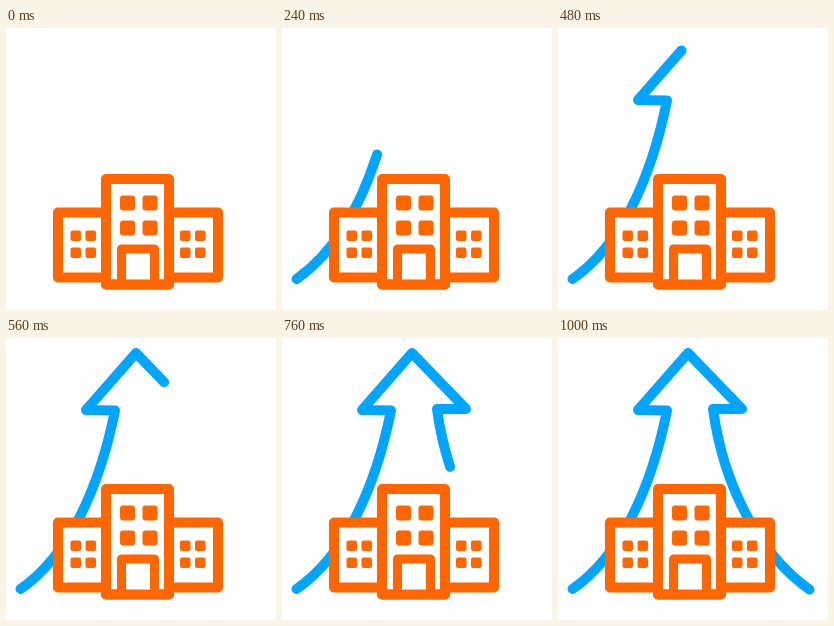
These frames come from a looping animation (270 by 282 pixels, 1720 ms). An HTML page:

```html
<!DOCTYPE html>
<html lang="en">
<head>
<meta charset="utf-8">
<title>Growth arrow</title>
<style>
  html, body { margin: 0; width: 100%; height: 100%; overflow: hidden; background: #fff; }
  svg { display: block; width: 100%; height: 100%; }
  .arrow, .wall { stroke-width: 10; stroke-linecap: round; stroke-linejoin: round; }
  .arrow {
    fill: none;
    stroke: #00a5ff;
    stroke-dasharray: 25 60;
    animation: draw 1720ms infinite, show 1720ms step-end infinite;
  }
  .wall { fill: #fff; stroke: #ff6600; }
  .window { fill: #ff6600; }

  /* 25 equal pen steps of 40 ms, then a hold */
  @keyframes draw {
    0% { stroke-dashoffset: 25; animation-timing-function: steps(25, end); }
    58.13%, 100% { stroke-dashoffset: 0; }
  }
  /* hides the round cap before the first step */
  @keyframes show {
    0% { opacity: 0; }
    2.325%, 100% { opacity: 1; }
  }
</style>
</head>
<body>
<svg viewBox="0 0 270 282">
  <defs>
    <g id="small" class="window">
      <rect x="0" y="0" width="10.5" height="10.5" rx="2"/>
      <rect x="15" y="0" width="10.5" height="10.5" rx="2"/>
      <rect x="0" y="17" width="10.5" height="10.5" rx="2"/>
      <rect x="15" y="17" width="10.5" height="10.5" rx="2"/>
    </g>
  </defs>

  <path class="arrow" pathLength="25"
    d="M14.5 251 C62 218 93 152 109 72.5 L80 72 L130 15 L184 71 L155 71 C166 152 204 218 251.5 251.5"/>

  <rect class="wall" x="52" y="184.5" width="160" height="65"/>
  <use href="#small" x="64.5" y="202.5"/>
  <use href="#small" x="174" y="202.5"/>

  <rect class="wall" x="100" y="151" width="63" height="105.5"/>
  <g class="window">
    <rect x="114" y="167.5" width="15" height="15" rx="3"/>
    <rect x="136.5" y="167.5" width="15" height="15" rx="3"/>
    <rect x="114" y="192.5" width="15" height="15" rx="3"/>
    <rect x="136.5" y="192.5" width="15" height="15" rx="3"/>
  </g>
  <path class="wall" d="M115.5 256 V221 H148.5 V256" style="stroke-width:9"/>
  <path class="wall" d="M100 256.5 H163"/>
</svg>
</body>
</html>
```
